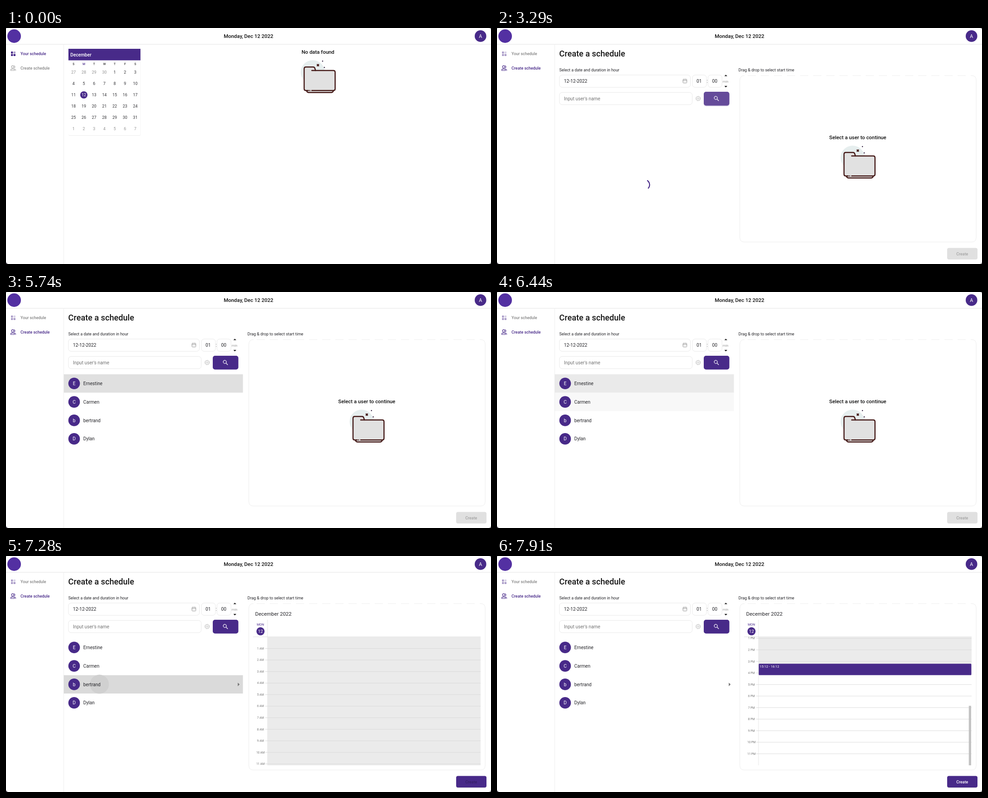
Write an HTML page that moves like this. It is 1072x522 px and loops after 8 s.

```html
<!DOCTYPE html>
<html lang="en">
<head>
<meta charset="utf-8">
<title>Schedule planner</title>
<style>
  html, body { margin: 0; width: 100%; height: 100%; overflow: hidden; background: #fff; }
  svg { display: block; width: 100%; height: 100%; font-family: Roboto, "Open Sans", sans-serif; }
</style>
</head>
<body>
<svg id="stage" viewBox="0 0 1072 522"></svg>
<script>
const LOOP = 8000, STEP = 70;
const PURPLE = "#482a89", INK = "#242428";
const ROW_H = 40.8, HOUR = 25.53, GRID_TOP = 179, GRID_H = 284, SCROLL_MAX = 24 * HOUR - GRID_H;
const people = ["Ernestine", "Carmen", "bertrand", "Dylan"];

const text = (x, y, s, size, o = {}) =>
  `<text x="${x}" y="${y}" font-size="${size}" fill="${o.fill || INK}" font-weight="${o.weight || 400}"` +
  ` text-anchor="${o.anchor || "start"}"${o.id ? ` id="${o.id}"` : ""}>${s}</text>`;
const mid = (x, y, s, size, fill, weight) => text(x, y, s, size, { fill, weight, anchor: "middle" });
const rect = (x, y, w, h, fill, extra = "") =>
  `<rect x="${x}" y="${y}" width="${w}" height="${h}" fill="${fill}" ${extra}/>`;
const circle = (x, y, r, fill, extra = "") => `<circle cx="${x}" cy="${y}" r="${r}" fill="${fill}" ${extra}/>`;
const line = (x1, y1, x2, y2, color, extra = "") =>
  `<path d="M${x1} ${y1}L${x2} ${y2}" stroke="${color}" ${extra}/>`;
const path = (d, fill, extra = "") => `<path d="${d}" fill="${fill}" ${extra}/>`;
const range = (n, fn) => Array.from({ length: n }, (_, i) => fn(i)).join("");

// Empty-state picture, placed by the centre of its small cross
const folder = (x, y) => `<g transform="translate(${x} ${y})">
  ${circle(-11.5, 15.5, 26.5, "#e6eeee")}
  <g fill="#e1e1e1" stroke="#451a18" stroke-width="2.5" stroke-linecap="round" stroke-linejoin="round">
    <path d="M-25 57Q-24 60.5 -20 60.5H29Q33 60.5 34 57"/>
    <path d="M-30.5 52V8Q-30.5 4 -26.5 4H-10.5Q-8 4 -7 6.5L-5.3 11.8H34Q38 11.8 38 15.8V52Q38 56 34 56H-26.5Q-30.5 56 -30.5 52Z"/>
    <path d="M-13.5 11.8H-5"/>
  </g>
  ${line(-20, 56, -14.5, 56, "#e1e1e1", 'stroke-width="2.8"')}
  ${line(-18.8, 56, -17, 56, "#451a18", 'stroke-width="2.5"')}
  <path d="M-2.2 -2.2L2.2 2.2M2.2 -2.2L-2.2 2.2" stroke="#451a18" stroke-width="2.3"/>
  ${circle(10.3, -9, 1.2, "#2b1838")}${circle(14.2, 5, 1.2, "#2b1838")}
</g>`;

const sidebar = () => `
  <clipPath id="pillClip">${rect(0.5, 73, 127, 31.5, "#000", 'rx="15.7"')}</clipPath>
  ${rect(0.5, 73, 127, 31.5, "#000", 'rx="15.7" id="pill"')}
  <g clip-path="url(#pillClip)">${circle(62, 86, 0, PURPLE, 'id="navRipple"')}</g>
  <g id="nav0">
    ${rect(11, 52, 4.4, 4.4, PURPLE, 'rx="1"')}${rect(16.6, 52, 4.4, 4.4, PURPLE, 'rx="1" opacity=".45"')}
    ${rect(11, 57.6, 4.4, 4.4, PURPLE, 'rx="1"')}${rect(16.6, 57.6, 4.4, 4.4, PURPLE, 'rx="1"')}
  </g>
  ${text(32, 60.2, "Your schedule", 8.92, { weight: 500, id: "label0" })}
  <g id="nav1" fill="none" stroke-width="1.1" stroke-linecap="round">
    <circle cx="14.7" cy="86" r="2.6"/>
    <path d="M10.5 94V92.8Q10.5 90.6 13 90.6H16.4Q18.8 90.6 18.8 92.8V94ZM18 83.5A2.6 2.6 0 0 1 18 88.5M19.4 90.7Q21.4 91 21.4 93V94"/>
  </g>
  ${text(32, 92.1, "Create schedule", 8.92, { weight: 500, id: "label1" })}
  ${line(127.7, 36, 127.7, 522, "#ececec")}`;

const header = () => `
  ${line(0, 36.2, 1072, 36.2, "#e9e9e9", 'stroke-width="1.2"')}
  ${circle(18, 18, 15, "#5330a2")}
  ${mid(536, 22, "Monday, Dec 12 2022", 11.42, "#111", 500)}
  ${circle(1048.8, 17.9, 12.8, PURPLE)}${mid(1048.8, 21.8, "A", 10.8, "#fff")}`;

const monthDay = i => {
  const n = i - 3, x = 149.3 + (i % 7) * 22.75, y = 101.2 + Math.floor(i / 7) * 25;
  const inside = n >= 1 && n <= 31;
  const day = n < 1 ? n + 30 : n > 31 ? n - 31 : n;
  const today = n === 12;
  return (today ? circle(x, y - 3.2, 8.1, PURPLE) : "") +
    mid(x, y, day, 8.9, today ? "#fff" : inside ? "#303034" : "#929292");
};

const overview = () => `<g id="overview">
  ${rect(138, 47, 159.5, 191.3, "#ececec", 'rx="3"')}
  ${rect(138, 46, 159.2, 191.3, "#fff", 'rx="2.5"')}
  ${rect(138, 46, 159.2, 25.5, PURPLE)}
  ${text(142.3, 62.5, "December", 10.2, { fill: "#fff", weight: 500 })}
  ${range(7, i => mid(149.3 + i * 22.75, 81.8, "SMTWTFS"[i], 6.6, i === 1 ? PURPLE : "#333", 500))}
  ${range(42, monthDay)}
  ${mid(689.5, 56.7, "No data found", 11.42, "#111", 500)}
  ${folder(689.5, 82.2)}
</g>`;

const field = (x, y, w) => rect(x, y, w, 27.2, "#fff", 'rx="6" stroke="#e9e9e9"');

const form = () => `
  ${text(137.6, 62.6, "Create a schedule", 18.15, { fill: "#151515", weight: 500 })}
  ${text(137.8, 95.6, "Select a date and duration in hour", 8.92)}
  ${field(138, 104, 289.5)}${text(148, 120.8, "12-12-2022", 10.2)}
  <g fill="none" stroke="#8a8a8a" stroke-width=".9">
    <rect x="411" y="113.6" width="8.6" height="8" rx="1.2"/><path d="M411 116.6H419.6M413.2 112.3V114.6M417.4 112.3V114.6"/>
  </g>
  ${field(432, 104, 31)}${mid(446.7, 120.8, "01", 10.2)}
  ${mid(464.8, 120.5, ":", 10.2, "#666")}
  ${field(466.3, 104, 31)}${mid(481.3, 120.8, "00", 10.2)}
  ${path("M502.6 106.6h6.4l-3.2 -3.3zM502.6 128.1h6.4l-3.2 3.3z", "#222")}
  ${text(498.8, 120.6, "min", 7.65, { fill: "#999" })}
  ${field(138, 142.5, 293.5)}${text(148, 159.6, "Input user's name", 10.2, { fill: "#727272" })}
  <g fill="none" stroke="#bdbdbd">
    <circle cx="444.6" cy="156" r="4.4"/><circle cx="444.6" cy="156" r="1.7"/>
    <circle cx="444.6" cy="156" r="5.1" stroke-width="1" stroke-dasharray="2 2"/>
  </g>
  ${rect(457, 142.5, 56.6, 30.5, PURPLE, 'rx="5" id="searchShadow" opacity="0"')}
  ${rect(457, 141, 56.6, 30.5, PURPLE, 'rx="5" id="search"')}
  ${path("M15.5 14h-.79l-.28-.27A6.5 6.5 0 1 0 13.73 14.43l.27.28v.79l5 4.99L20.49 19zM9.5 14A4.5 4.5 0 1 1 9.5 5A4.5 4.5 0 0 1 9.5 14z",
    "#fff", 'transform="translate(477.6 148.6) scale(.6375)"')}
  <g id="noUsers">${mid(325.4, 303, "No users found", 11.42, "#111", 500)}${folder(325.5, 328.6)}</g>
  <circle id="spinner" r="11.7" pathLength="126.9" fill="none" stroke="${PURPLE}" stroke-width="2.2"/>`;

const personRow = (name, i) => {
  const y = 182 + i * ROW_H, c = y + 20.3;
  return rect(127.7, y, 396, 40.6, "#e0e0e0", `id="row${i}" opacity="0"`) +
    (i === 2 ? circle(206.5, c - 0.3, 0, "#d0d0d0", 'id="rowRipple"') : "") +
    circle(150.6, c, 12.8, PURPLE) + mid(150.6, c + 3.7, name[0], 10.4, "#fff") +
    text(170.8, c + 3.6, name, 10.2);
};

const hourLine = i => {
  const y = GRID_TOP + (i + 1) * HOUR, h = i + 1;
  return line(573, y, 1049, y, "#d9d9d9", 'stroke-width=".9"') +
    mid(562.5, y + 2.3, `${(h - 1) % 12 + 1} ${h < 12 ? "AM" : "PM"}`, 6.4, "#6f6f6f");
};

const dayView = () => `<g id="dayView">
  ${text(550.8, 132.3, "December 2022", 11.42)}
  ${mid(562.2, 154.4, "MON", 7.1, PURPLE)}
  ${circle(562.5, 166.6, 9, PURPLE)}${mid(562.5, 170.2, "12", 9.8, "#fff")}
  ${line(578, 141, 578, 463, "#e6e6e6")}${line(546, 178.8, 1049, 178.8, "#e2e2e2")}
  <clipPath id="gridClip">${rect(546, GRID_TOP, 503, GRID_H, "#000")}</clipPath>
  <g clip-path="url(#gridClip)">
    <g id="hours">
      ${rect(578, GRID_TOP, 471, 15.2 * HOUR, "#ebebeb")}
      ${range(23, hourLine)}
      ${rect(578.5, GRID_TOP + 15.2 * HOUR, 470, HOUR - 0.4, PURPLE, 'rx="1.5"')}
      ${text(580.5, GRID_TOP + 15.2 * HOUR + 8.8, "15:12 - 16:12", 7.5, { fill: "#fff" })}
    </g>
    ${rect(1042.8, GRID_TOP, 5.2, GRID_H * GRID_H / (24 * HOUR), "#c3c3c3", 'id="thumb"')}
  </g>
</g>`;

const planner = () => `
  ${text(533.8, 95.6, "Drag &amp; drop to select start time", 8.92)}
  <path d="M547 105.2Q536.7 105.2 536.7 116V463Q536.7 473.4 547 473.4H1049Q1059.2 473.4 1059.2 463V116Q1059.2 105.2 1049 105.2" fill="none" stroke="#ededed"/>
  ${line(554, 105.2, 1049, 105.2, "#ededed", 'stroke-dasharray="18 11"')}
  <g id="pickUser">${mid(797.4, 245.6, "Select a user to continue", 11.42, "#111", 500)}${folder(797.5, 271.2)}</g>
  ${dayView()}
  ${rect(995, 487.5, 67, 25.5, "#000", 'rx="4" opacity=".14" id="createShadow"')}
  ${rect(995, 486.5, 67, 25.5, "#e0e0e0", 'rx="4" id="create"')}
  ${text(1028.3, 502.5, "Create", 8.92, { weight: 500, anchor: "middle", id: "createText" })}`;

const corners = () =>
  path("M0 522V517Q.5 521.5 5 522Z", "#221d2b") + path("M1072 522V517Q1071.5 521.5 1067 522Z", "#777") +
  path("M1072 0V4Q1071.5 .5 1068 0Z", "#8a8a8a") + path("M0 0V2.5Q.3 .3 2.5 0Z", "#aaa");

document.getElementById("stage").innerHTML = header() + sidebar() + overview() +
  `<g id="creator">${form()}<g id="list">${people.map(personRow).join("")}
  ${path("M512.3 280.2V288L516.4 284.1Z", "#757575", 'id="arrow"')}</g>${planner()}</g>` + corners();

const el = {};
document.querySelectorAll("[id]").forEach(n => el[n.id] = n);
const set = (id, attrs) => { for (const k in attrs) el[id].setAttribute(k, attrs[k]); };
const show = (id, on) => set(id, { display: on ? "inline" : "none" });
const ramp = (t, a, b) => Math.min(1, Math.max(0, (t - a) / (b - a)));
const ease = x => x * x * (3 - 2 * x);
const pulse = (t, a, b, c, d) => ramp(t, a, b) - ramp(t, c, d);
const mix = (a, b, k) => `rgb(${a.map((v, i) => Math.round(v + (b[i] - v) * k))})`;

function drawNav(t, creating) {
  const hot = creating ? 1 : ramp(t, 840, 1050);
  const grey = [136, 136, 136], purple = [72, 42, 137];
  set("nav0", { opacity: creating ? 0.45 : 1 });
  set("label0", { fill: creating ? "#858585" : PURPLE });
  set("nav1", { stroke: mix([165, 165, 165], purple, hot) });
  set("label1", { fill: mix(grey, purple, hot) });
  set("pill", { opacity: (creating ? 0.08 : 0.04) * pulse(t, 840, 1050, 1960, 2170) });
  set("navRipple", {
    r: t < 1820 ? 0 : 4 + (t - 1820) * 0.045,
    opacity: 0.13 * pulse(t, 1750, 1820, 1960, 2170)
  });
}

function drawSpinner(t) {
  const p = (t - 3010) / 1400;
  const grow = ease(ramp(p, 0, 0.5)), slide = ease(ramp(p, 0.5, 1));
  set("spinner", {
    "stroke-dasharray": `${1 + 99 * grow} 200`,
    "stroke-dashoffset": -(15 * grow + 110 * slide),
    transform: `translate(325.6 346.8) rotate(${p * 360 - 144})`
  });
}

function draw(t) {
  const creating = t >= 1750, listed = t >= 3780, picked = t >= 7280, ready = t >= 7420;
  drawNav(t, creating);
  show("overview", !creating);
  show("creator", creating);

  const hover = pulse(t, 2240, 2520, 4130, 4410);
  set("search", { fill: mix([72, 42, 137], [101, 75, 154], hover) });
  set("searchShadow", { opacity: 0.28 * hover });
  show("noUsers", t < 3010);
  show("spinner", t >= 3010 && !listed);
  drawSpinner(t);

  show("list", listed);
  set("row0", { opacity: pulse(t, 4270, 4550, 6370, 6580) });
  set("row1", { opacity: 0.6 * pulse(t, 6400, 6510, 6510, 6620) });
  set("row2", { opacity: pulse(t, 6440, 6650, 7350, 7560), fill: t >= 6930 ? "#dadada" : "#e0e0e0" });
  set("rowRipple", { r: t < 6930 ? 0 : picked ? 21 : 16, opacity: 1 - ramp(t, 7280, 7490) });
  show("arrow", picked);

  show("pickUser", !picked);
  show("dayView", picked);
  const scroll = SCROLL_MAX * ease(ramp(t, 7350, 7770));
  set("hours", { transform: `translate(0 ${-scroll})` });
  set("thumb", { y: GRID_TOP + scroll * GRID_H / (24 * HOUR) });
  show("thumb", ready);
  show("createShadow", picked);
  set("create", { fill: picked ? PURPLE : "#e0e0e0" });
  set("createText", { fill: ready ? "#fff" : picked ? "#351f65" : "#a3a3a3" });
}

function tick(now) {
  draw(Math.floor(now % LOOP / STEP) * STEP);
  requestAnimationFrame(tick);
}
draw(0);
requestAnimationFrame(tick);
</script>
</body>
</html>
```
